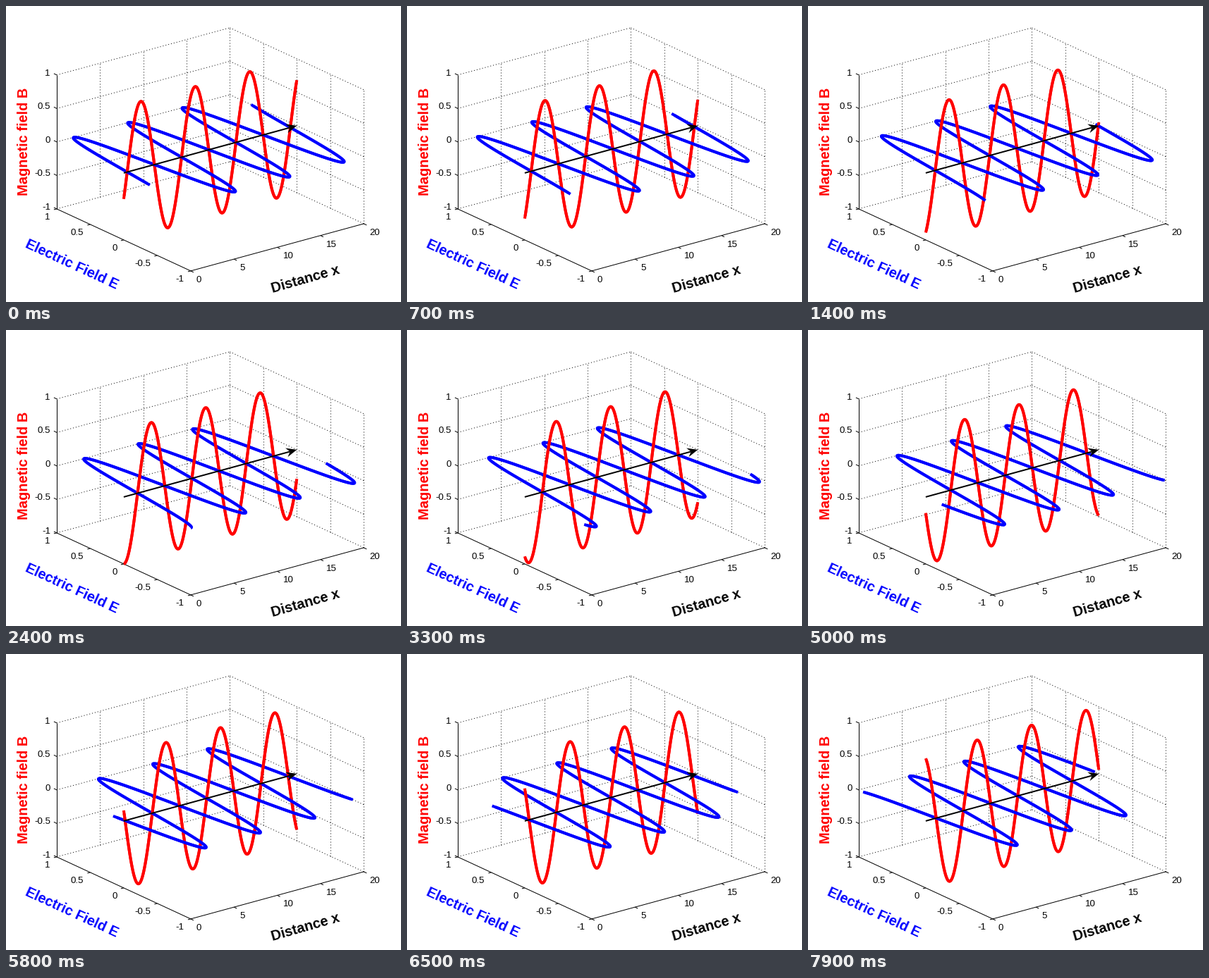
These frames come from a looping animation (560x420 px, 8 s). A matplotlib script:

```python
import numpy as np
import matplotlib.pyplot as plt
from matplotlib.animation import FuncAnimation
from matplotlib.collections import LineCollection

W, H, DPI = 560, 420, 80
PX = 72 / DPI                       # one pixel in points
FRAMES, INTERVAL = 80, 100
PHASE0, STEP = 0.4, 0.05            # wave phase and its advance per frame
RED, BLUE = "#ff0000", "#0000ff"

plt.rcParams["font.family"] = "Liberation Sans"
fig = plt.figure(figsize=(W / DPI, H / DPI), dpi=DPI, facecolor="white")
ax = fig.add_axes([0, 0, 1, 1])
ax.set_xlim(-0.5, W - 0.5)
ax.set_ylim(H - 0.5, -0.5)
ax.axis("off")


def project(x, e, b):
    """Orthographic view of (distance, E, B) in stage pixels."""
    x, e, b = np.broadcast_arrays(x, e, b)
    return np.stack([166.4 + 12.27 * x - 95 * e,
                     236.4 - 3.35 * x - 44 * e - 95 * b], axis=-1)


def nearness(x, e, b):
    return -0.527 * x / 20 - 0.687 * e / 2 + 0.5 * b / 2


def add_lines(segments, **style):
    ax.add_collection(LineCollection(segments, colors="black", linewidths=PX,
                                     **style))


def edge(p, q):
    return [project(*p), project(*q)]


def label(x, y, text, size=13.3, **style):
    ax.text(x, y, text, fontsize=size * PX, **style)


# Dotted grid on the two back walls
x_ticks = [0, 5, 10, 15, 20]
u_ticks = [-1, -0.5, 0, 0.5, 1]
grid = [edge((x, 1, -1), (x, 1, 1)) for x in x_ticks[1:]]
grid += [edge((20, u, -1), (20, u, 1)) for u in u_ticks[:-1]]
for u in u_ticks:
    grid.append(edge((0, 1, u), (20, 1, u)))
    grid.append(edge((20, 1, u), (20, -1, u)))
add_lines(grid, linestyles=[(0, (1, 3))], zorder=1)

# Solid axes, ticks and tick labels
solid = [edge((0, 1, -1), (0, 1, 1)),
         edge((0, -1, -1), (0, 1, -1)),
         edge((0, -1, -1), (20, -1, -1))]
for x in x_ticks:
    p = project(x, -1, -1)
    solid.append([p, p + (4, 2)])
    label(p[0] + 8, p[1] + 11.5, f"{x}", ha="left", va="center_baseline")
for u in u_ticks:
    p = project(0, u, -1)
    solid.append([p, p + (-4, 1)])
    label(p[0] - 9.5, p[1] + 10.5, f"{u:g}", ha="right", va="center_baseline")
    p = project(0, 1, u)
    solid.append([p, p + (-4, -2)])
    label(p[0] - 9, p[1] - 3.5, f"{u:g}", ha="right", va="center_baseline")
add_lines(solid, zorder=2)

title = dict(size=20, weight="bold", ha="center", va="baseline",
             rotation_mode="anchor")
label(30.5, 191.5, "Magnetic field B", color=RED, rotation=90, **title)
label(90, 371.5, "Electric Field E", color=BLUE, rotation=-24.8, **title)
label(425.5, 393, "Distance x", color="black", rotation=16, **title)

# Propagation arrow with a notched head
tail, tip = project(0, 0, 0), project(20, 0, 0)
along = (tip - tail) / np.hypot(*(tip - tail))
across = np.array([-along[1], along[0]])
notch = tip - 10 * along
ax.plot(*np.transpose([tail, notch]), color="black", lw=2 * PX, zorder=4,
        solid_capstyle="butt")
ax.fill(*np.transpose([tip, tip - 15 * along + 6.5 * across, notch,
                       tip - 15 * along - 6.5 * across]),
        color="black", lw=0, zorder=5)

# Both waves share one collection so that nearer pieces cover farther ones
dist = np.linspace(0, 20, 401)
waves = LineCollection([], linewidths=4 * PX, capstyle="butt", zorder=3)
ax.add_collection(waves)
tints = np.repeat([[1.0, 0, 0], [0, 0, 1.0]], len(dist) - 2, axis=0)


def pieces(e, b):
    """Overlapping short segments of a curve and the depth of each."""
    pts = project(dist, e, b)
    return (np.stack([pts[:-2], pts[1:-1], pts[2:]], axis=1),
            nearness(dist, e, b)[1:-1])


def update(i):
    s = np.sin(dist - PHASE0 - STEP * i)
    red, red_depth = pieces(0, s)
    blue, blue_depth = pieces(s, 0)
    order = np.argsort(np.concatenate([red_depth, blue_depth]), kind="stable")
    waves.set_segments(np.concatenate([red, blue])[order])
    waves.set_color(tints[order])
    return [waves]


anim = FuncAnimation(fig, update, frames=FRAMES, interval=INTERVAL,
                     repeat=True, repeat_delay=0, blit=False)
plt.show()
```
